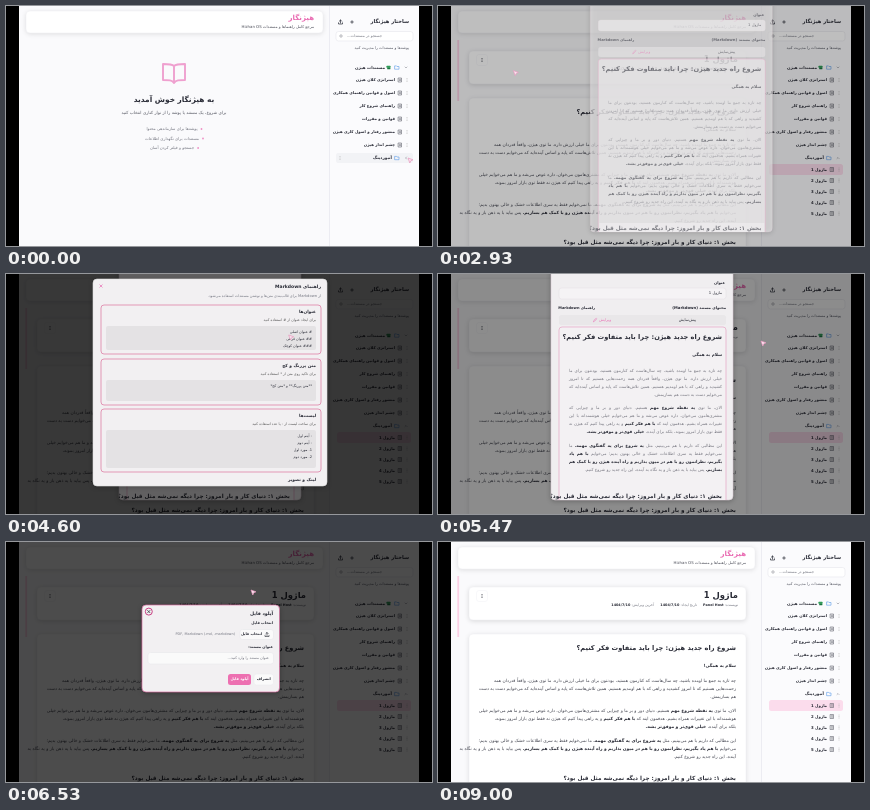
These frames come from a looping animation (426 px wide and 240 px high, 9.07 s). An HTML page with a canvas:

```html
<!DOCTYPE html>
<html lang="fa">
<head>
<meta charset="utf-8">
<style>
html, body { margin: 0; width: 100%; height: 100%; overflow: hidden; background: #000; }
canvas { display: block; width: 100vw; height: 100vh; }
</style>
</head>
<body>
<canvas id="stage"></canvas>
<script>
const W = 426, H = 240, LOOP = 9070;
const canvas = document.getElementById('stage');
const ctx = canvas.getContext('2d');
const PINK = '#e96bb2', INK = '#282a35', GREY = '#747680', LINE = '#e6e6ec';
const BRAND = 'هیژنگار', TEAM = 'هیژن';
const HEADING = `شروع راه جدید ${TEAM}: چرا باید متفاوت فکر کنیم؟`;
const NEXT_HEADING = 'بخش ۱: دنیای کار و بار امروز: چرا دیگه نمی~شه مثل قبل بود؟';

// A tilde stands for the zero-width non-joiner.
const joinless = str => str.replaceAll('~', String.fromCharCode(8204));

// Asterisks mark bold words; slashes are line breaks in the wide layout.
const PARAGRAPHS = [
  `چه تازه به جمع ما اومده باشید، چه سال~هاست که کنارمون هستید، بودنتون برای ما خیلی ارزش داره. ما توی ${TEAM}، واقعاً قدردان همه / زحمت~هایی هستیم که تا امروز کشیدید و راهی که با هم اومدیم هستیم. همین تلاش~هاست که پایه و اساس آینده~ایه که می~خوایم دست به دست / هم بسازیمش.`,
  `الان، ما توی *یه نقطه شروع مهم* هستیم. دنیای دور و بر ما و چیزایی که مشتری~هامون می~خوان، داره عوض می~شه و ما هم می~خوایم خیلی / هوشمندانه با این تغییرات همراه بشیم. هدفمون اینه که *با هم فکر کنیم* و یه راهی پیدا کنیم که ${TEAM} نه فقط توی بازار امروز بمونه، / بلکه برای آینده، *خیلی قوی~تر و موفق~تر بشه.*`,
  `این مطالبی که داریم با هم می~بینیم، مثل *یه شروع برای یه گفتگوی مهمه.* ما نمی~خوایم فقط یه سری اطلاعات خشک و خالی بهتون بدیم؛ / می~خوایم *با هم یاد بگیریم، نظراتمون رو با هم در میون بذاریم و راه آینده ${TEAM} رو با کمک هم بسازیم.* پس بیاید با یه ذهن باز و یه نگاه به / آینده، این راه جدید رو شروع کنیم.`
];

const ramp = (t, from, to) => {
  const p = Math.min(1, Math.max(0, (t - from) / (to - from)));
  return p * p * (3 - 2 * p);
};

function setFont(size, bold) {
  ctx.font = `${bold ? 'bold ' : ''}${size}px "DejaVu Sans", sans-serif`;
}

function text(str, x, y, size, { color = INK, bold = false, align = 'right', dir = 'rtl' } = {}) {
  const label = joinless(str);
  setFont(size, bold);
  ctx.direction = dir;
  ctx.textAlign = align;
  ctx.textBaseline = 'middle';
  ctx.fillStyle = color;
  ctx.fillText(label, x, y);
  return ctx.measureText(label).width;
}

function box(x, y, w, h, r, fill, stroke, lineWidth = 0.6, shadow = 0) {
  ctx.beginPath();
  ctx.roundRect(x, y, w, h, r);
  if (fill) {
    ctx.save();
    if (shadow) {
      ctx.shadowColor = `rgba(0,0,0,${shadow})`;
      ctx.shadowBlur = 5;
      ctx.shadowOffsetY = 1;
    }
    ctx.fillStyle = fill;
    ctx.fill();
    ctx.restore();
  }
  if (stroke) {
    ctx.strokeStyle = stroke;
    ctx.lineWidth = lineWidth;
    ctx.stroke();
  }
}

function path(d, x, y, color, lineWidth = 0.7) {
  ctx.save();
  ctx.translate(x, y);
  ctx.strokeStyle = color;
  ctx.lineWidth = lineWidth;
  ctx.lineJoin = ctx.lineCap = 'round';
  ctx.stroke(new Path2D(d));
  ctx.restore();
}

const icons = {
  book: 'M0-7C-2-9-5-9-11-9V7C-5 7-2 7 0 10C2 7 5 7 11 7V-9C5-9 2-9 0-7V10',
  doc: 'M-1.5-2H1.5V2H-1.5ZM-.7-.7H.7M-.7.6H.7',
  folder: 'M-2-1.6H-.5L0-1H2V1.7H-2Z',
  upload: 'M0 1V-2M-1.2-.8L0-2L1.2-.8M-2 .8V2H2V.8',
  plus: 'M-1.3 0H1.3M0-1.3V1.3',
  cross: 'M-1.2-1.2L1.2 1.2M1.2-1.2L-1.2 1.2',
  down: 'M-1-.5L0 .5L1-.5',
  left: 'M.5-1L-.5 0L.5 1',
  up: 'M-1 .5L0-.5L1 .5',
  dots: 'M0-1.5V-1.4M0 0V.1M0 1.5V1.6',
  pen: 'M-1.5 1.5L-1 .2L1.2-1.8L1.8-1.2L-.2 1Z'
};

function paragraph(str, right, y, width, size, leading, { color = INK, justify = false } = {}) {
  const lines = [[]];
  let bold = false, used = 0;
  setFont(size, false);
  const gap = ctx.measureText(' ').width;
  for (const token of joinless(str).split(' ')) {
    if (token === '/') {
      if (!justify) lines.push([]);
      continue;
    }
    if (token.startsWith('*')) bold = true;
    const word = token.replaceAll('*', '');
    setFont(size, bold);
    const w = ctx.measureText(word).width;
    if (justify && used + w > width) {
      lines.push([]);
      used = 0;
    }
    lines.at(-1).push({ word, bold, w });
    used += w + gap;
    if (token.endsWith('*')) bold = false;
  }
  lines.forEach((line, i) => {
    const total = line.reduce((sum, item) => sum + item.w, 0);
    const space = justify && i < lines.length - 1 ? (width - total) / Math.max(1, line.length - 1) : gap;
    let x = right;
    for (const item of line) {
      text(item.word, x, y, size, { bold: item.bold, color: item.bold ? INK : color });
      x -= item.w + space;
    }
    y += leading;
  });
  return y;
}

function entry(label, y) {
  path(icons.doc, 394, y, '#555762', 0.55);
  path(icons.dots, 401, y, '#aaa', 0.6);
  text(label, 389, y, 3.9, { bold: true });
}

function sidebar(t) {
  ctx.fillStyle = '#fbfbfd';
  ctx.fillRect(323, 0, 90, H);
  ctx.fillStyle = LINE;
  ctx.fillRect(323, 0, 0.7, H);
  text(`ساختار ${BRAND}`, 403, 16, 5.2, { bold: true });
  path(icons.plus, 346, 16, INK);
  path(icons.upload, 334.5, 16, INK);
  box(330, 25.5, 77, 9.5, 2.5, '#fff', LINE);
  text('جستجو در مستندات...', 376, 30, 3.8, { color: GREY });
  ctx.beginPath();
  ctx.arc(335, 30, 1.2, 0, 7);
  ctx.strokeStyle = GREY;
  ctx.lineWidth = 0.5;
  ctx.stroke();
  text('پوشه~ها و مستندات را مدیریت کنید', 403, 42.5, 3.8, { color: '#555762' });

  path(icons.down, 400, 61.5, GREY, 0.5);
  path(icons.folder, 391, 61.5, '#5b9be8', 0.6);
  box(380.5, 59.8, 4, 2, 0.5, '#2e9d57');
  box(381.2, 61.5, 3.2, 1.8, 0.5, '#18773f');
  text(`مستندات ${TEAM}`, 379, 61.5, 4.1, { bold: true });

  const items = [`استراتژی کلان ${TEAM}`, 'اصول و قوانین راهنمای همکاری', 'راهنمای شروع کار',
    'قوانین و مقررات', `منشور رفتار و اصول کاری ${TEAM}`, `چشم انداز ${TEAM}`];
  items.forEach((label, i) => entry(label, 74 + i * 13));

  const opened = ramp(t, 150, 400);
  if (t < 700) box(330, 147, 77, 10, 2, '#f2f3f6');
  path(opened > 0.5 ? icons.up : icons.left, 400, 152, GREY, 0.5);
  path(icons.folder, 391, 152, '#5b9be8', 0.6);
  text('آنبوردینگ', 386, 152, 4.1, { bold: true });
  if (opened < 1) path(icons.dots, 334, 152, '#aaa', 0.6);

  ctx.save();
  ctx.beginPath();
  ctx.rect(324, 157, 89, 56 * opened);
  ctx.clip();
  if (t >= 1050) box(331, 158, 74, 11, 2.5, '#fbdcec');
  for (let i = 0; i < 5; i++) entry(`ماژول ${i + 1}`, 163.5 + i * 11);
  ctx.restore();
}

function welcome() {
  path(icons.book, 168, 67, '#efa0cf', 1.9);
  text(`به ${BRAND} خوش آمدید`, 168, 94, 7.4, { bold: true, align: 'center' });
  text('برای شروع، یک مستند یا پوشه را از نوار کناری انتخاب کنید', 168, 107, 4.3, { color: '#555762', align: 'center' });
  ['پوشه~ها برای سازماندهی محتوا', 'مستندات برای نگهداری اطلاعات', 'جستجو و فیلتر کردن آسان'].forEach((line, i) => {
    const y = 123 + i * 9.5;
    const w = text(line, 166, y, 4, { color: GREY, align: 'center' });
    ctx.beginPath();
    ctx.arc(166 + w / 2 + 4, y, 0.9, 0, 7);
    ctx.fillStyle = '#ef8fc4';
    ctx.fill();
  });
}

function article() {
  ctx.fillStyle = '#fbd0e5';
  ctx.fillRect(19.3, 34, 1.8, 61);
  box(31, 45, 277, 33, 4, '#fff', '#eeeef2', 0.5, 0.15);
  text('ماژول 1', 300, 54, 8.4, { bold: true });
  const nameWidth = text('نویسنده: ', 300, 63.3, 3.6, { color: GREY });
  text('Panel Host', 300 - nameWidth, 63.3, 3.4, { bold: true });
  [['تاریخ ایجاد: ', 259], ['آخرین ویرایش: ', 216]].forEach(([label, x]) => {
    const w = text(label, x, 63.3, 3.6, { color: GREY });
    text('1404/7/10', x - w, 63.3, 3.4, { bold: true, dir: 'ltr' });
  });
  box(38.5, 48.5, 11, 11, 2.5, '#fff', '#f0f0f4', 0.5);
  path(icons.dots, 44, 54, INK, 0.8);
  box(31, 92, 277, 170, 4, '#fff', '#eeeef2', 0.5, 0.12);
  text(HEADING, 298, 106, 6.6, { bold: true });
  text('سلام به همگی!', 298, 124, 4.3, { bold: true });
  PARAGRAPHS.forEach((p, i) => paragraph(p, 298, 138.5 + i * 30, 258, 4.4, 8, { color: '#41434e' }));
  text(NEXT_HEADING, 298, 236.5, 5.7, { bold: true });
}

function page(t) {
  ctx.fillStyle = '#fafafc';
  ctx.fillRect(13, 0, 400, H);
  box(20, 5, 297, 22, 4, '#fff', '#eeeef2', 0.5, 0.12);
  text(BRAND, 308, 12, 7, { bold: true, color: PINK });
  text('مرجع کامل راهنماها و مستندات Hizhan OS', 308, 21.3, 3.9, { color: '#4d4f5a' });
  if (t < 1100) welcome(); else article();
  sidebar(t);
  const menu = ramp(t, 2050, 2180) * (1 - ramp(t, 2650, 2780));
  if (menu) {
    ctx.globalAlpha = menu;
    box(38, 61, 44, 25, 3, '#fff', LINE, 0.5, 0.2);
    if (t > 2350) box(40, 63, 40, 10, 2, '#fbdcec');
    text('ویرایش', 72, 68, 4);
    path(icons.pen, 76, 68, INK, 0.5);
    text('حذف', 72, 79, 4, { color: '#d94258' });
    path(icons.cross, 76, 79, '#d94258', 0.5);
    ctx.globalAlpha = 1;
  }
}

function field(y, h, label, color = GREY) {
  box(142, y, 125.5, h, 2.5, '#fafafa', '#e4e4e8', 0.5);
  text(label, 263, y + Math.min(h / 2, 5.5), 3.7, { color });
}

function button(x, y, w, label, primary) {
  box(x, y, w, 11, 2.5, primary ? '#ed70b1' : '#fafafa', primary ? null : '#e8e8ec', 0.5);
  text(label, x + w / 2, y + 5.5, 3.7, { bold: true, align: 'center', color: primary ? '#fff' : INK });
}

function editDialog() {
  box(113, -14, 182, 240, 4, '#f0eef0', '#d9cbd3', 0.6, 0.3);
  text('عنوان', 287, 9, 3.8, { bold: true });
  box(121, 14, 167, 11, 2.5, '#f5f3f5', '#e2dce0', 0.5);
  text('ماژول 1', 284, 19.5, 3.8);
  text('محتوای مستند (Markdown)', 288, 34, 3.8, { bold: true });
  text('راهنمای Markdown', 157, 34, 3.6, { bold: true });
  box(121, 41, 167, 10, 2.5, '#e9e7e9');
  text('پیش~نمایش', 258, 46, 3.8);
  text('ویرایش', 173, 46, 3.8, { color: PINK });
  path(icons.pen, 157, 46, PINK, 0.5);
  ctx.save();
  ctx.beginPath();
  ctx.rect(113, 50, 182, 176);
  ctx.clip();
  box(121, 53, 167, 190, 3, '#f3f1f3', '#e6a5c4', 0.7);
  text(HEADING, 284, 63, 6.6, { bold: true });
  text('سلام به همگی', 284, 80.5, 4.2, { bold: true });
  let y = 96.5;
  for (const p of PARAGRAPHS) y = paragraph(p, 284, y, 153, 4.2, 8, { color: '#777780', justify: true }) + 5.5;
  ctx.fillStyle = '#f3f1f3';
  ctx.fillRect(122, 217, 165, 10);
  text(NEXT_HEADING, 284, 223, 5.7, { bold: true });
  ctx.restore();
}

function guideDialog() {
  box(87, 5, 234, 207, 4, '#f2f0f2', '#ddd', 0.6, 0.25);
  text('راهنمای Markdown', 315, 13, 4.5, { bold: true });
  text('از Markdown برای قالب~بندی متن~ها و نوشتن مستندات استفاده می~شود.', 315, 22, 3.7, { color: GREY });
  path(icons.cross, 95, 12, PINK, 0.7);
  const sections = [
    [31, 49, 'عنوان~ها', 'برای ایجاد عنوان از # استفاده کنید', ['# عنوان اصلی', '## عنوان فرعی', '### عنوان کوچک']],
    [85, 46, 'متن پررنگ و کج', 'برای تاکید روی متن از * استفاده کنید', ['**متن پررنگ** و *متن کج*']],
    [135, 63, 'لیست~ها', 'برای ساخت لیست از - یا عدد استفاده کنید', ['- آیتم اول', '- آیتم دوم', '1. مورد اول', '2. مورد دوم']]
  ];
  for (const [y, h, title, hint, code] of sections) {
    box(95, y, 220, h, 3, null, '#dc719d', 0.7);
    text(title, 310, y + 7, 4.3, { bold: true });
    text(hint, 310, y + 15.5, 3.6, { color: '#555' });
    box(100, y + 21, 210, h - 25, 2, '#e4e2e4');
    code.forEach((line, i) => text(line, 306, y + 27 + i * 7, 3.6));
  }
  text('لینک و تصویر', 310, 206, 4.3, { bold: true });
}

function uploadDialog() {
  box(136, 63, 137.5, 87, 4, '#f2f0f2', '#d76b9e', 0.7, 0.3);
  ctx.beginPath();
  ctx.arc(142.8, 69.6, 3.5, 0, 7);
  ctx.strokeStyle = '#c94083';
  ctx.lineWidth = 1;
  ctx.stroke();
  path(icons.cross, 142.8, 69.6, INK, 0.7);
  text('آپلود فایل', 267, 71.5, 4.7, { bold: true });
  text('انتخاب فایل', 267, 81.5, 3.7, { bold: true });
  box(234, 87.5, 33.5, 10, 2.5, '#fafafa', '#e4e4e8', 0.5);
  path(icons.upload, 261, 92.5, INK, 0.6);
  text('انتخاب فایل', 256, 92.5, 3.6, { bold: true });
  text('PDF, Markdown (.md, .markdown)', 229, 92.5, 3.5, { color: GREY, dir: 'ltr' });
  text('عنوان مستند:', 267, 105, 3.7, { bold: true });
  field(110.5, 11.5, 'عنوان مستند را وارد کنید...');
  button(222, 132, 23, 'آپلود فایل', true);
  button(248, 132, 19.5, 'انصراف');
}

function createDialog() {
  box(136, 27, 137.5, 158, 4, '#f2f0f2', '#d9a0bd', 0.6, 0.3);
  path(icons.cross, 142.5, 33.5, INK, 0.6);
  text('ایجاد آیتم جدید', 267, 35.5, 4.7, { bold: true });
  text('نوع آیتم', 267, 45.5, 3.7, { bold: true });
  box(142, 51, 126, 11.5, 2.5, '#fafafa', '#d54c91', 1);
  text('-- مستند', 263, 56.7, 3.7, { bold: true });
  path(icons.doc, 245, 56.7, INK, 0.7);
  text('عنوان', 267, 70, 3.7, { bold: true });
  field(75, 10.5, 'عنوان مستند');
  text('محتوای مستند', 267, 93, 3.7, { bold: true });
  field(98, 39, 'محتوای مستند را اینجا بنویسید...');
  path('M-1 1L1-1M0 1L1 0', 144, 135, GREY, 0.4);
  text('پوشه والد (اختیاری)', 267, 143.5, 3.7, { bold: true });
  field(149, 10.5, '-- بدون پوشه والد --', INK);
  button(229, 168, 16, 'ایجاد', true);
  button(248, 168, 19.5, 'انصراف');
}

const dialogs = [
  { open: 2800, close: 5480, width: 182, dim: 0.45, draw: editDialog },
  { open: 3890, close: 4900, width: 234, dim: 0.6, draw: guideDialog },
  { open: 6050, close: 6850, width: 137, dim: 0.7, draw: uploadDialog },
  { open: 7200, close: 8050, width: 137, dim: 0.7, draw: createDialog }
];

function showDialog({ open, close, width, dim, draw }, t) {
  const shown = ramp(t, open, open + 240) * (1 - ramp(t, close, close + 240));
  if (!shown) return;
  ctx.save();
  ctx.filter = `blur(${0.6 * shown * canvas.width / W}px)`;
  ctx.drawImage(canvas, 0, 0, W, H);
  ctx.filter = 'none';
  ctx.fillStyle = `rgba(0,0,0,${dim * shown})`;
  ctx.fillRect(13, 0, 400, H);
  ctx.globalAlpha = shown;
  ctx.translate((1 - shown) * width / 2, 0);
  draw();
  ctx.restore();
}

// Pointer stops: time, x, y.
const route = [
  [0, 402, 152], [350, 402, 152], [800, 380, 163], [1100, 380, 163], [1600, 56, 50], [1800, 56, 50],
  [2000, 44, 54], [2150, 44, 54], [2400, 68, 67], [2800, 68, 67], [3500, 148, 41], [4050, 148, 41],
  [4850, 323, 67], [5500, 323, 67], [5900, 334, 16], [6150, 334, 16], [6530, 245, 48], [6800, 143, 69],
  [6900, 143, 69], [7120, 346, 16], [7220, 346, 16], [7530, 169, 89], [7900, 143, 34], [8100, 143, 34],
  [8800, 190, 250], [LOOP, 190, 250]
];

function pointer(t) {
  const i = route.findIndex(stop => stop[0] > t);
  const [t0, x0, y0] = route[i - 1], [t1, x1, y1] = route[i];
  const p = ramp(t, t0, t1);
  ctx.save();
  ctx.translate(x0 + (x1 - x0) * p, y0 + (y1 - y0) * p);
  const arrow = new Path2D('M0 0L5 1.8L2.8 2.8L1.8 5Z');
  ctx.fillStyle = '#fbe3ef';
  ctx.strokeStyle = '#e79abf';
  ctx.lineWidth = 0.7;
  ctx.lineJoin = 'round';
  ctx.fill(arrow);
  ctx.stroke(arrow);
  ctx.restore();
}

function resize() {
  canvas.width = Math.round(innerWidth * devicePixelRatio);
  canvas.height = Math.round(innerHeight * devicePixelRatio);
}

function frame() {
  const t = performance.now() % LOOP;
  ctx.setTransform(canvas.width / W, 0, 0, canvas.height / H, 0, 0);
  ctx.fillStyle = '#000';
  ctx.fillRect(0, 0, W, H);
  page(t);
  dialogs.forEach(dialog => showDialog(dialog, t));
  pointer(t);
  ctx.fillStyle = '#000';
  ctx.fillRect(0, 0, 13, H);
  ctx.fillRect(413, 0, 13, H);
  requestAnimationFrame(frame);
}

addEventListener('resize', resize);
resize();
frame();
</script>
</body>
</html>
```
